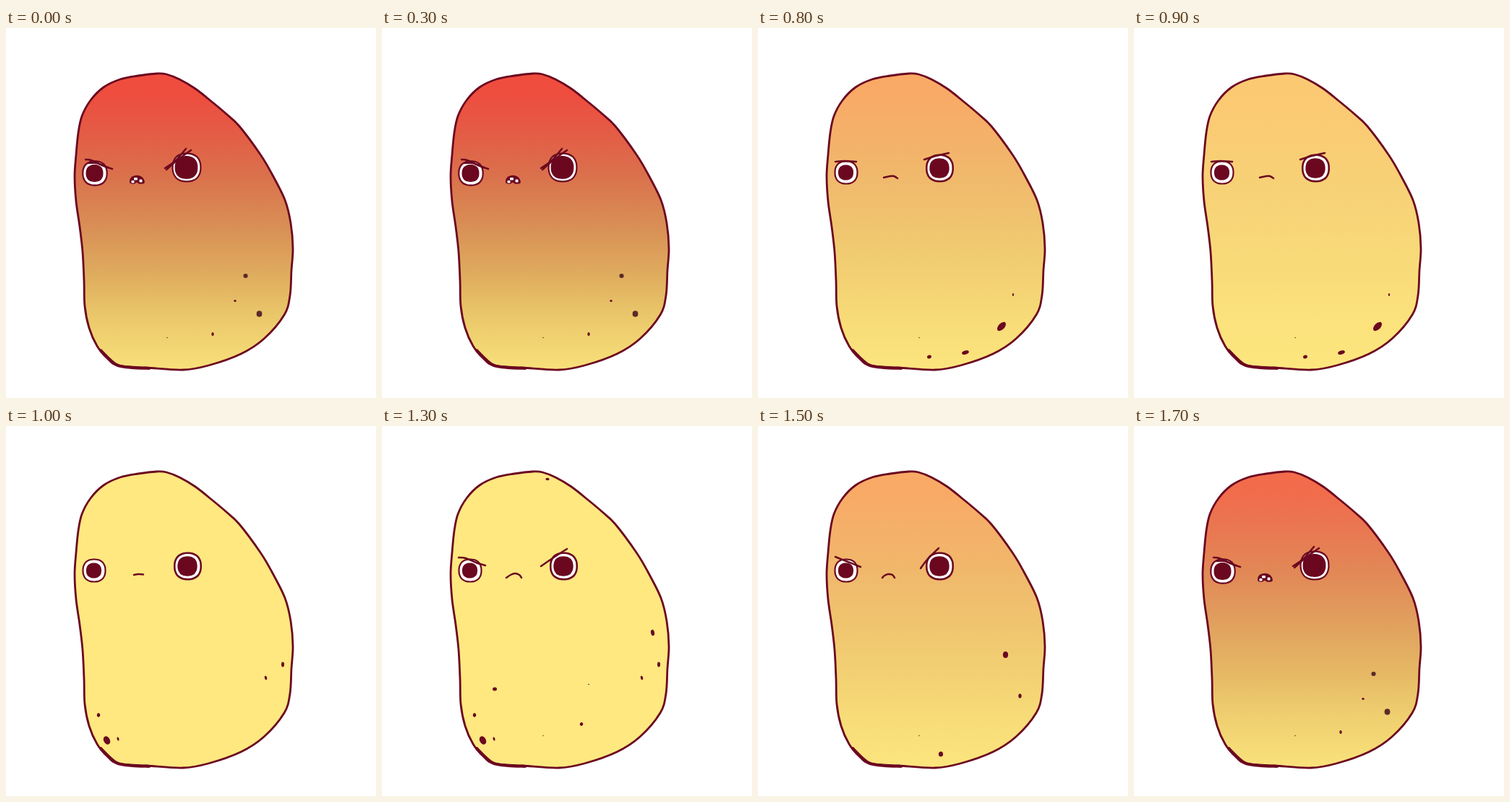
Write an HTML page with a canvas that moves like this. It is 512x512 px and loops after 1800 ms.

```html
<!DOCTYPE html>
<html lang="en">
<head>
<meta charset="utf-8">
<style>
  html, body { margin: 0; width: 100%; height: 100%; overflow: hidden; background: #fff; }
  canvas { display: block; width: 100vmin; height: 100vmin; }
</style>
</head>
<body>
<canvas id="stage" width="512" height="512"></canvas>
<script>
const ctx = document.getElementById('stage').getContext('2d');
const INK = '#6b0820', SKIN = '#ffe880';
const STEP = 100, LOOP = 1800;

// Smooth curve through points (Catmull-Rom).
function curve(pts, closed) {
  const n = pts.length;
  const at = i => closed ? pts[(i + n) % n] : pts[Math.max(0, Math.min(n - 1, i))];
  const path = new Path2D();
  path.moveTo(...pts[0]);
  for (let i = 0; i < (closed ? n : n - 1); i++) {
    const [a, b, c, d] = [at(i - 1), at(i), at(i + 1), at(i + 2)];
    path.bezierCurveTo(
      b[0] + (c[0] - a[0]) / 6, b[1] + (c[1] - a[1]) / 6,
      c[0] - (d[0] - b[0]) / 6, c[1] - (d[1] - b[1]) / 6, c[0], c[1]);
  }
  return path;
}

const parse = text => text.split(' ').map(p => p.split(',').map(Number));

const body = curve(parse('209,63 183,66 158,71 135,82 117,100 105,122 100,145 97,175 95,205 97,240 ' +
  '102,275 106,310 108,350 109,385 115,415 126,440 140,457 155,467 195,470 245,473 280,467 325,451 ' +
  '357,430 385,397 393,370 395,335 397,305 394,270 386,238 368,202 352,175 323,136 305,119 286,103 ' +
  '262,84 240,71 222,64'), true);
const shade = curve(parse('131,446 144,459 155,467 174,470 198,471'));

const flush = ctx.createLinearGradient(0, 63, 0, 472);
[[0, '#f04c3e'], [.07, '#ee4d3e'], [.17, '#e65844'], [.34, '#da704c'], [.53, '#d99156'],
 [.68, '#dfac5e'], [.83, '#ebc96b'], [1, '#f8e07a']].forEach(s => flush.addColorStop(...s));

// Eyes are [x, y, outer radius, white radius, pupil radius].
const calmEyes = [[122, 200, 17, 14.8, 10.8], [251.5, 194, 20, 17.4, 14]];
const wideEyes = [[123, 201, 18.2, 16, 12.3], [250, 193, 21, 18.8, 16.3]];

const faces = {
  blank: { eyes: calmEyes, lines: ['177,206 183,205 190,205.5'] },
  grumpy: { eyes: calmEyes, lines: ['107,185 120,184 136,185', '230,182 246,177 264,173',
    '174,207 183,205 188,205 193,208'] },
  cross: { eyes: calmEyes, lines: ['106,182 116,183 130,189 143,193', '220,194 236,183 256,170',
    '172,210 178,206 184,204 190,206 193,210'] },
  angry: { eyes: calmEyes, lines: ['107,181 122,187 142,195', '225,197 234,185 250,169',
    '172,210 175,207 180,205 186,206 189,210'] },
  furious: { eyes: wideEyes, teeth: true, lines: ['110,182 118,183 133,190 147,195',
    '114,187 126,187 138,192', '220,194 234,184 249,167', '222,196 238,182 256,169'] }
};

// Spots are x, y, radii and tilt.
const spots = {
  blank: '383,330,2,3.4,0 359.5,348.5,1.7,2.8,-.3 128,400,2.2,2.8,0 139.5,435,4.3,6,-.5 155,433,1.4,2.6,-.3',
  grumpy: '353,369,1.1,2,0 337,413,7.5,4.2,-.8 287,449,5,2.6,-.3 237,455,3,2.4,-.3',
  cross: '229,73.5,2.6,1.8,0 374.5,286,2.5,4.2,-.2 156,364,3,2.5,0 276,412.5,2.2,2.5,.6 286,357.5,.9,.8,0',
  cooling: '362,362,1.9,2.6,0',
  angry: '342.5,316.5,3.6,4.5,0 362.5,373.5,2.2,3.1,0 253,454,3.1,3.6,0',
  furious: '317,377.5,1.7,1.5,0 286,423.5,1.7,2.5,0',
  bruise: '331.5,343,3.1,2.9,0 350.5,395.5,3.9,4.3,0',
  speck: '223,428.5,.7,.7,0'
};

// [start step, face, extra spots]
const schedule = [
  [0, 'furious'], [5, 'angry'], [6, 'cross', 'cooling'], [8, 'grumpy'],
  [10, 'blank'], [13, 'cross', 'blank'], [15, 'angry'], [17, 'furious']
];

function stroke(path, width) {
  ctx.strokeStyle = INK;
  ctx.lineWidth = width;
  ctx.stroke(path);
}

function blob(x, y, r, color) {
  const pts = Array.from({ length: 16 }, (_, i) => {
    const a = i * Math.PI / 8, d = r * (1 - .025 * Math.cos(4 * a));
    return [x + d * Math.cos(a), y + d * Math.sin(a)];
  });
  ctx.fillStyle = color;
  ctx.fill(curve(pts, true));
}

function drawSpots(name, color = INK) {
  ctx.fillStyle = color;
  for (const [x, y, rx, ry, tilt] of parse(spots[name])) {
    ctx.beginPath();
    ctx.ellipse(x, y, rx, ry, tilt, 0, 7);
    ctx.fill();
  }
}

function drawTeeth() {
  const mouth = curve(parse('172,214 173,208 178,205 184,205 189,208 191,214 185,215 181,213 177,215'), true);
  ctx.fillStyle = INK;
  ctx.fill(mouth);
  stroke(mouth, 1.5);
  ctx.fillStyle = '#fff';
  for (const [x, y, w, h] of parse('177,207,5,3.5 173.5,211,4,3.5 184.5,209.5,4,4')) {
    ctx.beginPath();
    ctx.roundRect(x, y, w, h, 1.2);
    ctx.fill();
  }
}

function drawFace({ eyes, lines, teeth }) {
  for (const [x, y, outer, white, pupil] of eyes) {
    blob(x, y, outer, INK);
    blob(x, y, white, '#fff');
    blob(x - .5, y, pupil, INK);
  }
  lines.forEach(line => stroke(curve(parse(line)), 2.5));
  if (teeth) drawTeeth();
}

function draw(time) {
  const step = Math.floor(time % LOOP / STEP);
  const [, mood, extra] = schedule.findLast(([start]) => start <= step);
  const heat = Math.min(1, Math.max(0, (10 - step) / 5, (step - 13) / 5));

  ctx.clearRect(0, 0, 512, 512);
  ctx.fillStyle = SKIN;
  ctx.fill(body);
  ctx.globalAlpha = heat;
  ctx.fillStyle = flush;
  ctx.fill(body);
  ctx.globalAlpha = 1;
  stroke(body, 2.8);
  stroke(shade, 4);

  drawSpots(mood);
  if (extra) drawSpots(extra);
  if (mood === 'furious') drawSpots('bruise', '#5c2a28');
  if (mood !== 'blank') drawSpots('speck');
  drawFace(faces[mood]);
}

ctx.lineCap = ctx.lineJoin = 'round';
const begin = performance.now();
function tick() {
  draw(performance.now() - begin);
  requestAnimationFrame(tick);
}
tick();
</script>
</body>
</html>
```
